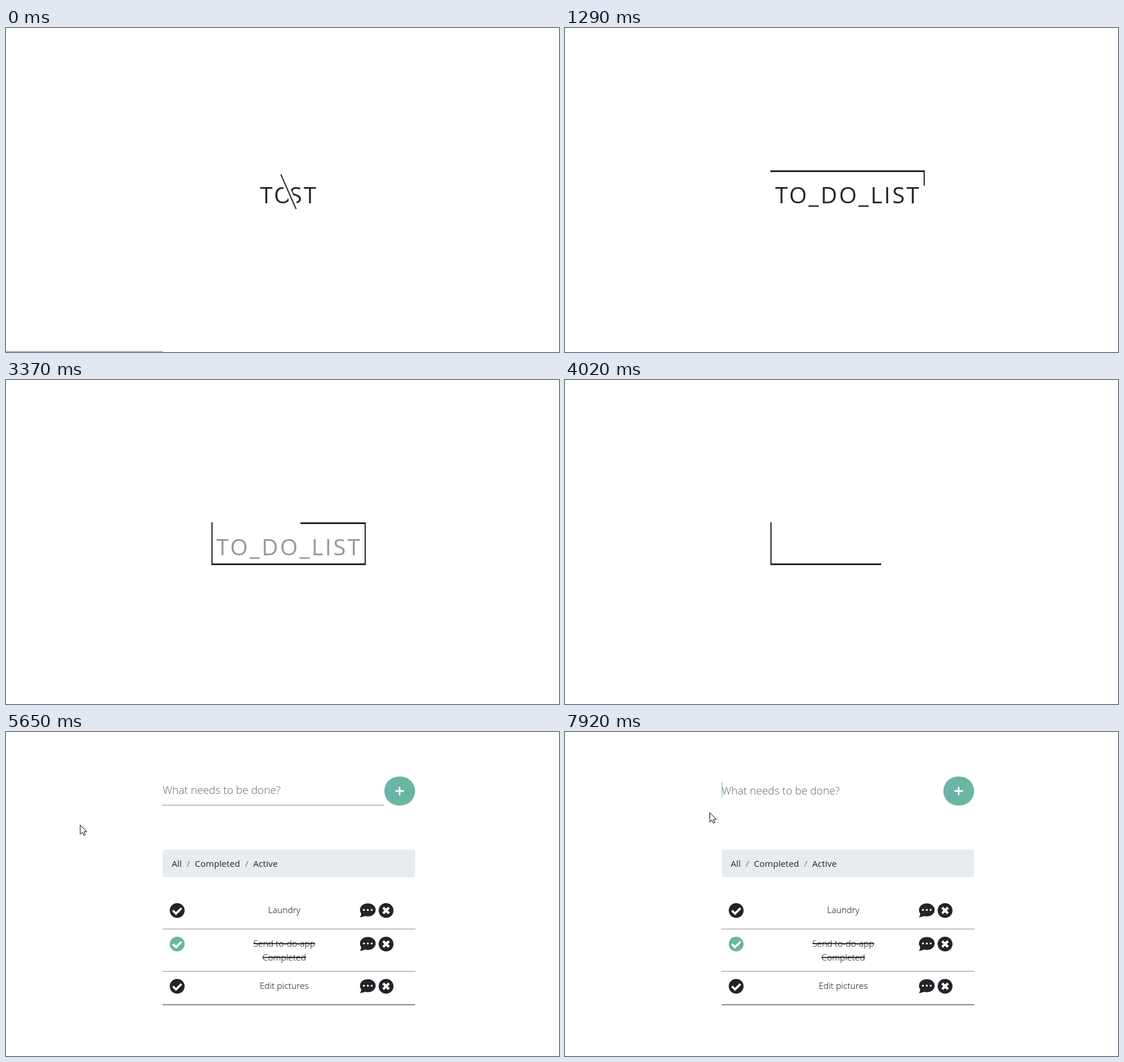
These frames come from a looping animation (953x560 px, 8000 ms). An HTML page:

```html
<!DOCTYPE html>
<html lang="en">
<head>
<meta charset="utf-8">
<title>To-do list</title>
<style>
  html, body { margin: 0; width: 100%; height: 100%; overflow: hidden; background: #fff; }
  svg { display: block; width: 953px; height: 560px; font-family: "Open Sans", "Noto Sans", sans-serif; }
  text { fill: #212529; font-size: 15.2px; white-space: pre; }
  .title { font-size: 39.2px; letter-spacing: 3.1px; }
  .prompt { font-size: 18.6px; font-weight: 300; fill: #5f676d; }
  .task { font-weight: 300; fill: #000; text-anchor: middle; }
  .done { text-decoration: line-through; }
  .dots { stroke: #212529; stroke-dasharray: 1 1; }
  .white { fill: none; stroke: #fff; }
</style>
</head>
<body>
<svg viewBox="0 0 953 560">
  <defs>
    <clipPath id="leftSide"><path d="M300 200H450.6L523.4 366H300Z"/></clipPath>
    <clipPath id="rightSide"><path d="M680 200H450.6L523.4 366H680Z"/></clipPath>
  </defs>

  <rect id="progress" y="558.5" width="270" height="1.5" fill="#a6a6a6"/>

  <g id="intro">
    <g id="words">
      <g clip-path="url(#leftSide)"><text id="leftWord" class="title" x="362.2" y="303">TO_DO_LIST</text></g>
      <g clip-path="url(#rightSide)"><text id="rightWord" class="title" x="362.2" y="303">TO_DO_LIST</text></g>
    </g>
    <line id="gap" stroke="#fff" stroke-width="10.5"/>
    <line id="slash" stroke="#212529" stroke-width="2"/>
    <g id="frame" stroke="#212529"></g>
  </g>

  <g id="app">
    <text id="prompt" class="prompt" x="270">What needs to be done?</text>
    <path id="underline" class="dots" d="M270 126.5H652"/>
    <path id="caret" d="M270.5 87V113" stroke="#6ab5a3"/>
    <rect x="652" y="77" width="53" height="50" rx="25" fill="#6ab5a3"/>
    <path class="white" stroke-width="2.8" stroke-linecap="round" d="M672 102H684.6M678.3 95.7V108.3"/>

    <rect x="270" y="203" width="435" height="48" rx="4" fill="#e9ecef"/>
    <text x="285.5" y="233">All</text>
    <text x="311.5" y="233" style="fill:#6c757d">/</text>
    <text x="325.5" y="233">Completed</text>
    <text x="412" y="233" style="fill:#6c757d">/</text>
    <text x="426" y="233">Active</text>

    <g id="tasks"></g>
    <path class="dots" d="M270 340.5H705M270 413.5H705"/>
    <path d="M270 471.5H705" stroke="#212529"/>
  </g>

  <g id="pointer">
    <path id="arrow" fill="#fff" stroke="#000" d="M.5 .5V16.5L4.2 13L6.8 18.6L9.4 17.5L6.9 12H11.8Z"/>
    <path id="beam" fill="none" stroke="#000" d="M-3 -7.5H-1L.5 -6.5L2 -7.5H4M.5 -6.5V6.5M-3 7.5H-1L.5 6.5L2 7.5H4"/>
  </g>
</svg>

<script>
const LOOP = 8000, STEP = 108.6;
const $ = id => document.getElementById(id);
const set = (el, attrs) => Object.entries(attrs).forEach(([k, v]) => el.setAttribute(k, v));
const show = (el, on) => { el.style.display = on ? '' : 'none'; };
const clamp = v => Math.min(1, Math.max(0, v));

// Piecewise linear value of a [time, value] table
function track(t, keys) {
  if (t <= keys[0][0]) return keys[0][1];
  for (let i = 1; i < keys.length; i++) {
    const [t0, v0] = keys[i - 1], [t1, v1] = keys[i];
    if (t <= t1) return v0 + (v1 - v0) * (t - t0) / (t1 - t0);
  }
  return keys[keys.length - 1][1];
}

const taskRow = ({ y, lines, done }) => `
  <g transform="translate(0 ${y})">
    <circle cx="295" r="12.8" fill="${done ? '#6ab5a3' : '#212529'}"/>
    <path class="white" stroke-width="3.8" d="M287.6 .2L293 5.4L302.4 -4"/>
    ${lines.map((s, i) => `<text class="task${done ? ' done' : ''}" x="479.5" y="${4.5 + 24 * i}">${s}</text>`).join('')}
    <g fill="#212529">
      <ellipse cx="623.5" cy="-1" rx="13.5" ry="11.2"/>
      <path d="M611.5 2Q613 8 610 11.6Q615.5 12 620 8.5Z"/>
      <circle cx="655" r="12.8"/>
    </g>
    <g fill="#fff">${[616.8, 623.5, 630.2].map(x => `<circle cx="${x}" cy="-1" r="1.7"/>`).join('')}</g>
    <path class="white" stroke-width="4.4" d="M650 -5L660 5M660 -5L650 5"/>
  </g>`;

$('tasks').innerHTML = [
  { y: 308.5, lines: ['Laundry'] },
  { y: 366.5, lines: ['Send to-do-app', 'Completed'], done: true },
  { y: 439.5, lines: ['Edit pictures'] }
].map(taskRow).join('');

// Frame sides, clockwise: start, end, thickness
const sides = [
  [354, 247.5, 620, 247.5, 3],
  [619, 246, 619, 320, 2],
  [620, 318.5, 354, 318.5, 3],
  [355, 320, 355, 246, 2]
].map(([x0, y0, x1, y1, width]) => {
  const el = document.createElementNS('http://www.w3.org/2000/svg', 'line');
  el.setAttribute('stroke-width', width);
  $('frame').append(el);
  return { el, x0, y0, dx: x1 - x0, dy: y1 - y0, length: Math.hypot(x1 - x0, y1 - y0) };
});

const frameDrawn = [[808, 0], [1168, 266], [1528, 340], [1888, 606], [2255, 680]];
const frameErased = [[2985, 0], [3800, 333], [4012, 415], [4650, 680]];
const slashHalf = [[0, 30], [330, 49], [440, 49], [820, 0]];
const pointerX = [[5300, 1], [6080, 290], [6290, 303], [7400, 303], [7910, 249]];
const pointerY = [[5300, 190], [6080, 122], [6290, 115], [7400, 115], [7910, 139]];

function drawFrame(from, to) {
  let start = 0;
  for (const { el, x0, y0, dx, dy, length } of sides) {
    const a = clamp((from - start) / length), b = clamp((to - start) / length);
    show(el, b > a);
    set(el, { x1: x0 + dx * a, y1: y0 + dy * a, x2: x0 + dx * b, y2: y0 + dy * b });
    start += length;
  }
}

function drawIntro(t) {
  const shift = 75.5 * (1 - clamp(t / 400)) ** 2;
  set($('leftWord'), { transform: `translate(${shift} 0)` });
  set($('rightWord'), { transform: `translate(${-shift} 0)` });
  $('words').style.opacity = track(t, [[2985, 1], [3700, 0]]);

  const half = track(t, slashHalf), lean = half * 0.4386;
  for (const id of ['gap', 'slash']) {
    show($(id), half > 0);
    set($(id), { x1: 486.8 - lean, y1: 283 - half, x2: 486.8 + lean, y2: 283 + half });
  }
  drawFrame(track(t, frameErased), track(t, frameDrawn));
}

function drawApp(t) {
  const focused = t > 6590;
  $('app').style.opacity = track(t, [[4670, 0], [4980, 1]]);
  set($('prompt'), { y: focused ? 108 : 107 });
  show($('underline'), !focused);
  show($('caret'), focused && (t < 7140 || t > 7670));

  const x = track(t, pointerX), y = track(t, pointerY);
  const overInput = x >= 270 && y < 127;
  show($('pointer'), t > 5300);
  set($('pointer'), { transform: `translate(${x} ${y})` });
  show($('beam'), overInput);
  show($('arrow'), !overInput);
}

function render(now) {
  const step = Math.floor((now % LOOP + 20) / STEP);
  const t = Math.max(0, step * STEP - 6);
  show($('progress'), step === 0);
  show($('intro'), t < 4670);
  show($('app'), t >= 4670);
  drawIntro(t);
  drawApp(t);
}

const begin = performance.now();
function tick() {
  render(performance.now() - begin);
  requestAnimationFrame(tick);
}
tick();
</script>
</body>
</html>
```
